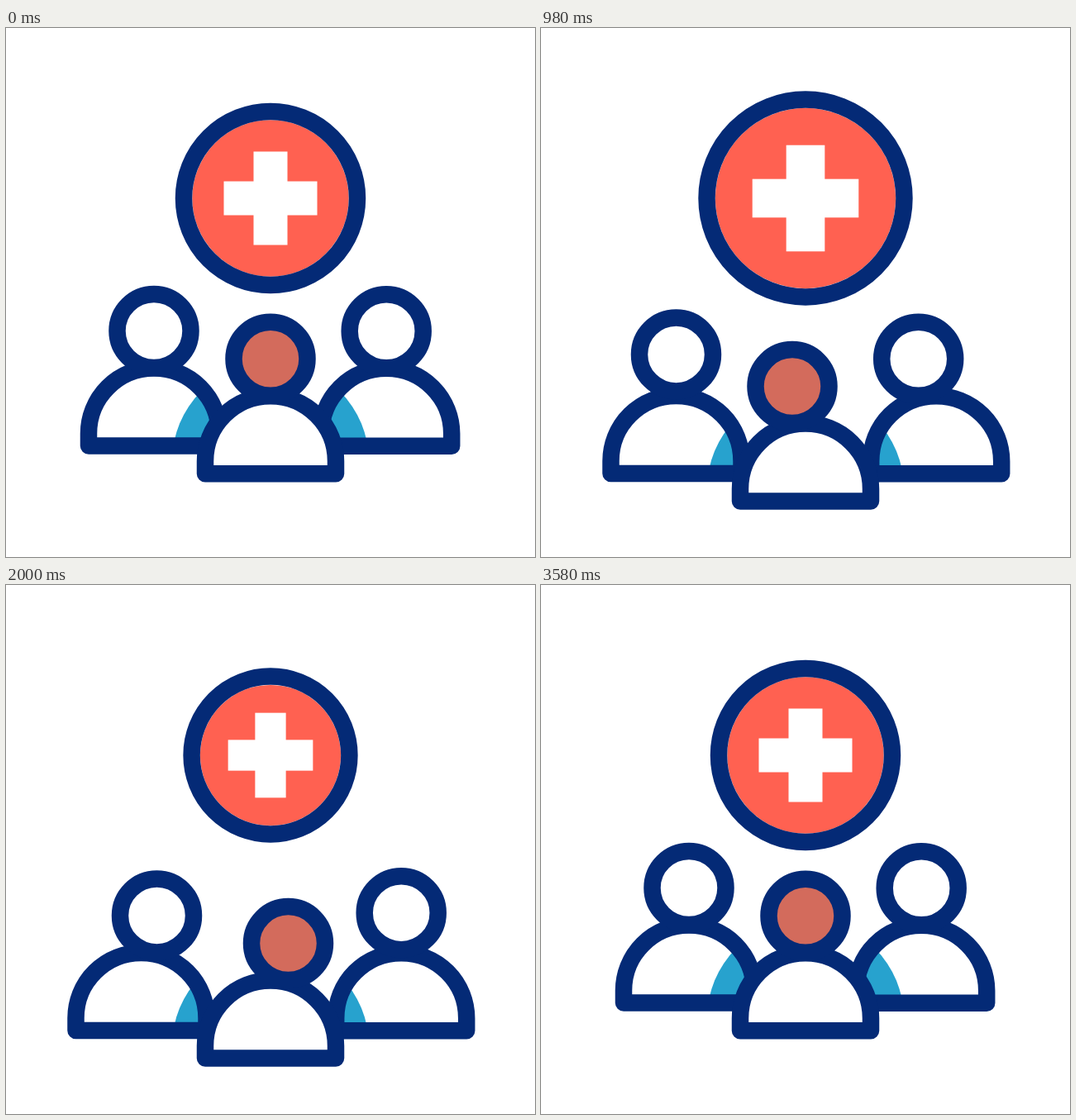
Recreate the animation shown at these times as an HTML page with a canvas. Size 640 px wide and 640 px high, loop 3.6 s.

```html
<!DOCTYPE html>
<html lang="en">
<head>
<meta charset="utf-8">
<title>Care team</title>
<style>
  html, body { margin: 0; width: 100%; height: 100%; overflow: hidden; background: #fff; }
  canvas { display: block; width: 640px; height: 640px; }
</style>
</head>
<body>
<canvas id="stage" width="640" height="640"></canvas>
<script>
const LOOP = 3600;
const NAVY = '#042a76', CORAL = '#ff6151', BLUE = '#27a2ce', TINT = '#d36b5c';
const LINE = 20.5, TAU = Math.PI * 2;
const ctx = document.getElementById('stage').getContext('2d');

// Tracks are [time, value] pairs, eased in and out between neighbours.
const tracks = {
  spread: [[0, 0], [440, 1], [3160, 1], [3560, 0]],
  leanLeft: [[1260, 0], [1600, 19], [2740, 19], [3200, 0]],
  leanMid: [[140, 0], [570, -16], [1260, -16], [1600, 21.5], [2740, 21.5], [3200, 0]],
  leanRight: [[140, 0], [570, -21.5], [1260, -21.5], [1600, 0]],
  scale: [[0, 1], [580, .82], [870, 1.25], [1195, .82], [1520, 1.25], [1845, .82], [2160, 1]],
  ringStart: [[2160, 0], [2440, 1]],
  ringEnd: [[2480, 0], [3080, 1]]
};

function at(name, t) {
  const keys = tracks[name];
  const i = keys.findIndex(k => k[0] > t);
  if (i === 0) return keys[0][1];
  if (i < 0) return keys[keys.length - 1][1];
  const [t0, a] = keys[i - 1], [t1, b] = keys[i];
  return a + (b - a) * (1 - Math.cos(Math.PI * (t - t0) / (t1 - t0))) / 2;
}

function nod(t, from, to) {
  return t < from || t > to ? 0 : -5 * Math.sin(Math.PI * (t - from) / 560) ** 2;
}

function disc(x, y, r, fill) {
  ctx.beginPath();
  ctx.arc(x, y, r, 0, TAU);
  ctx.fillStyle = fill;
  ctx.fill();
}

function torso(x, y) {
  ctx.beginPath();
  ctx.moveTo(x - 79, y);
  ctx.lineTo(x - 79, y - 15);
  ctx.arc(x, y - 15, 79, Math.PI, 0);
  ctx.lineTo(x + 79, y);
  ctx.closePath();
}

// x, y mark the middle of the torso's base line.
function person(x, y, lean, lift, face, shadowY) {
  torso(x, y);
  ctx.fillStyle = '#fff';
  ctx.fill();
  if (shadowY) {
    ctx.save();
    ctx.clip();
    disc(320, shadowY, 119, BLUE);
    ctx.restore();
  }
  torso(x, y);
  ctx.stroke();
  const hx = x + lean, hy = y - 139 + lift;
  disc(hx, hy, 44.5, face);
  ctx.stroke();
}

function badge(t) {
  const x = 320, y = 206, s = at('scale', t);
  disc(x, y, 105 * s - 10.3, CORAL);

  const long = 56.5 * s, half = 20.5 * s;
  ctx.fillStyle = '#fff';
  ctx.fillRect(x - long, y - half, 2 * long, 2 * half);
  ctx.fillRect(x - half, y - long, 2 * half, 2 * long);

  const redraw = t >= 2480;
  const from = redraw ? 0 : at('ringStart', t);
  const to = redraw ? at('ringEnd', t) : 1;
  if (to - from < .001) return;
  ctx.beginPath();
  ctx.arc(x, y, 105 * s, (from - .25) * TAU, (to - .25) * TAU);
  ctx.stroke();
}

function draw(t) {
  ctx.fillStyle = '#fff';
  ctx.fillRect(0, 0, 640, 640);
  ctx.strokeStyle = NAVY;
  ctx.lineWidth = LINE;
  ctx.lineJoin = ctx.lineCap = 'round';

  const k = at('spread', t), drop = 33.4 * k;
  const shadowY = 524 + drop;
  badge(t);
  person(179 - 15.5 * k, 505.5 + drop, at('leanLeft', t), nod(t, 700, 1260), '#fff', shadowY);
  person(460.2 + 18 * k, 505.8 + drop, at('leanRight', t), nod(t, 1620, 2740), '#fff', shadowY);
  person(320, 539.2 + drop, at('leanMid', t), 0, TINT);
}

function tick() {
  draw(performance.now() % LOOP);
  requestAnimationFrame(tick);
}
tick();
</script>
</body>
</html>
```
